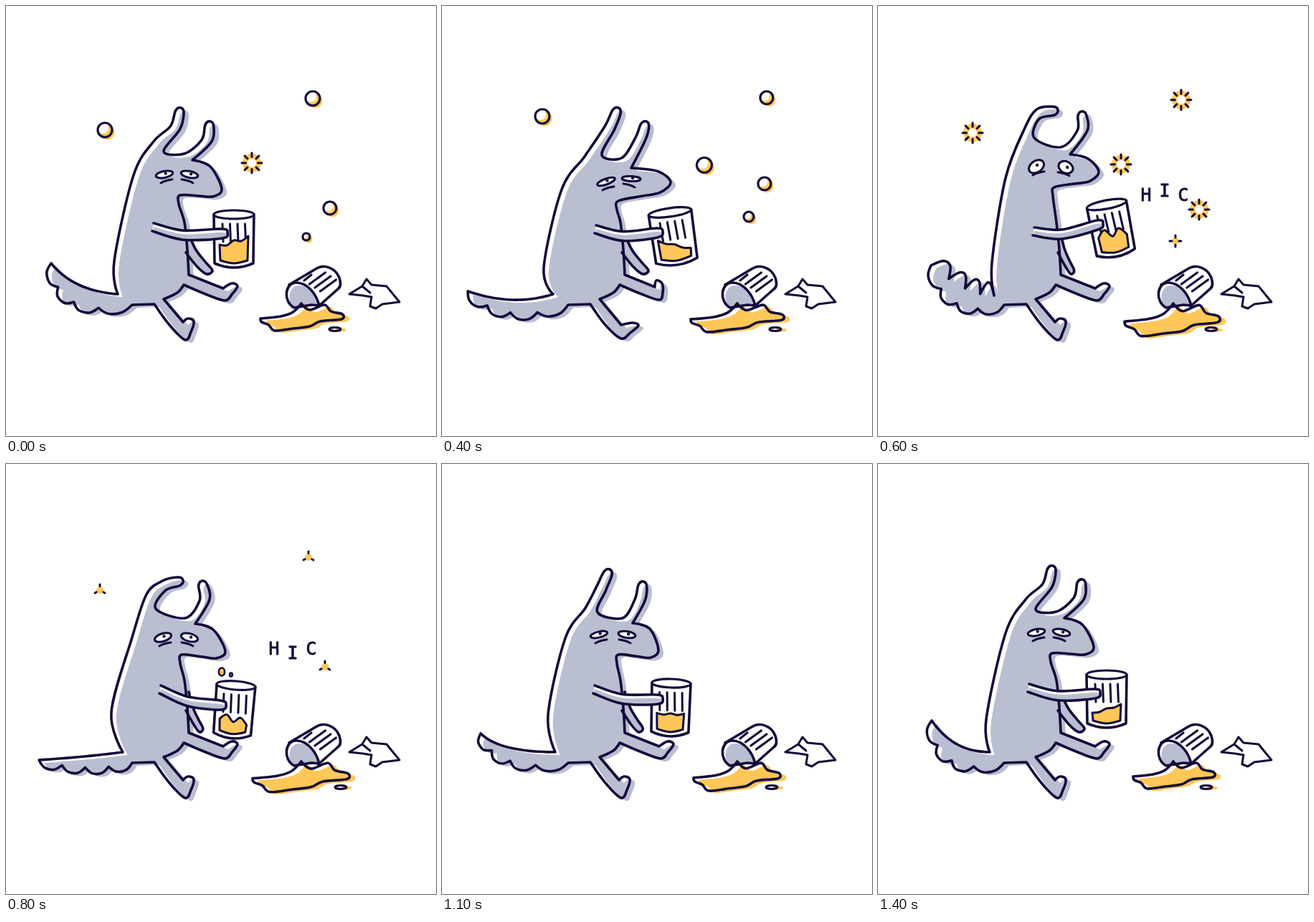
Write an HTML page with a canvas that moves like this. It is 600 px wide and 600 px high and loops after 1500 ms.

```html
<!DOCTYPE html>
<html lang="en">
<head>
<meta charset="utf-8">
<title>Hic</title>
<style>
html, body { margin: 0; width: 100%; height: 100%; overflow: hidden; background: #fff; }
canvas { display: block; }
</style>
</head>
<body>
<canvas width="600" height="600"></canvas>
<script>
const INK = '#140a3a', GREY = '#b9bed1', GOLD = '#ffc757', WHITE = '#fff';
const ctx = document.querySelector('canvas').getContext('2d');

// Key points of a pose; the other poses override only what moves.
// head: root, back, shoulder, nape, ear 1 bend + tip, valley left + right, ear 2 bend + tip, brow, snout, nose, jaw
// tail: tip, lower control, upper control    feet: ankle, toe, heel of each leg    arm: shoulder, hand
// glass: x, y, radius, angle | beer level, slope, wave    puddle: left, right, depth
const base = {
  head: '156,402 151,356 178,236 206,189 236,170 244,142 220,203 249,206 280,188 285,161 260,215 285,224 301,255 243,264',
  tail: '63,359 70,438 95,398', fluff: '0',
  feet: '303,394 319,388 305,411 247,441 258,437 250,466', paw: '285',
  arm: '206,303 309,316', eyes: '221,235,12,4.5,-.2 256,235,12,4.5,.2',
  glass: '318,291,28,0 38,-6,2', puddle: '355,471,1',
  marks: '138,173,10 428,129,10 452,282,9 419,322,5 343,219,10'
};
const poses = {
  drowsy: { kinds: 'bbbbs' },
  alert: {
    head: '153,402 151,358 176,241 203,199 234,166 242,140 225,203 249,204 267,174 269,145 256,216 300,212 314,222 243,267',
    tail: '48,367 55,445 80,402', feet: '294,392 300,384 303,411 251,445 265,440 250,465', paw: '277',
    arm: '214,306 307,326', eyes: '221,232,11,4.5,-.15 256,231,12,4.5,.05',
    glass: '320,296,30,.02 40,0,-5', puddle: '360,467,1', kinds: 'oooor',
    marks: '125,146,6.5 443,148,6.5 464,266,14.5 414,307,6 361,198,10'
  },
  lean: {
    head: '155,402 142,365 167,256 199,210 234,170 246,142 223,208 251,212 277,185 285,161 264,226 302,231 319,246 246,272',
    tail: '36,398 85,448 100,420', feet: '297,392 303,384 303,410 250,445 270,443 250,464',
    arm: '215,306 308,315', eyes: '229,245,13,4,-.35 264,241,13,3.5,.05',
    glass: '318,288,30,-.14 46,8,1', puddle: '347,477,1.05', kinds: 'bbbbb',
    marks: '140,154,10 453,128,9 450,248,9 428,294,7 366,222,10.5'
  },
  hiccup: {
    head: '162,404 159,358 178,240 205,170 223,151 251,145 218,184 255,197 285,174 285,147 268,207 293,213 308,231 246,253',
    tail: '74,362 95,440 125,405', fluff: '16', paw: '272',
    arm: '218,309 314,304', eyes: '221,224,11.5,8,-.6 262,225,10.5,8,.5',
    glass: '319,277,28,-.19 40,1,-5', puddle: '344,477,1.2', kinds: 'sssxs', hic: 3,
    marks: '132,177,10 423,131,10 448,284,10 415,328,5 339,221,10'
  },
  slump: {
    head: '163,402 147,346 176,242 196,182 220,170 247,162 209,202 250,215 277,190 274,163 264,223 289,231 306,261 245,266',
    tail: '46,413 110,432 110,409', paw: '273',
    arm: '216,309 307,335', eyes: '219,242,12,5.5,-.3 256,242,12,5.5,.25',
    glass: '321,309,27,.08 47,3,-4', puddle: '344,479,1.12', kinds: 'tttdd', hic: -3,
    marks: '131,176,8 422,130,8 445,283,8 301,290,5.5 314,294,2.5'
  },
  settle: {
    head: '158,402 148,350 172,243 200,201 222,174 234,147 217,207 252,215 276,190 281,164 266,222 290,230 302,260 246,266',
    tail: '54,376 75,432 80,402', paw: '278',
    arm: '213,309 308,327', eyes: '219,238,12,4,-.25 258,238,12,4.5,.15',
    glass: '320,306,27,.03 43,0,1', puddle: '351,472,1.08'
  },
  calm: { tail: '75,358 80,440 105,402', arm: '211,307 310,319', glass: '319,294,28,0 48,-6,1', puddle: '356,470,1' }
};

const parse = s => s.split(' ').map(p => p.split(',').map(Number));

function blend(from, to = from, k = 0) {
  const a = { ...base, ...poses[from] }, b = { ...base, ...poses[to] };
  const pose = { kinds: b.kinds && a.kinds || '', hic: b.hic && a.hic };
  for (const part in base) {
    const end = parse(b[part]);
    pose[part] = parse(a[part]).map((p, i) => p.map((v, j) => v + (end[i][j] - v) * k));
  }
  return pose;
}

const steps = [
  [0, blend('drowsy')], [200, blend('alert')], [400, blend('lean')],
  [500, { ...blend('lean', 'hiccup', .5), hic: 0 }], [600, blend('hiccup')], [800, blend('slump')],
  [900, blend('slump', 'settle', .2)], [1100, blend('settle')],
  [1200, blend('settle', 'calm', .25)], [1400, blend('calm')]
];

const mix = (a, b, k, dx = 0, dy = 0) => [a[0] + (b[0] - a[0]) * k + dx, a[1] + (b[1] - a[1]) * k + dy];
const corner = ([x, y]) => [x, y, 1];

// Smooth curve through points; corners have no tangent.
function curve(pts, closed) {
  const path = new Path2D(), n = pts.length;
  const at = i => closed ? pts[(i + n) % n] : pts[Math.max(0, Math.min(n - 1, i))];
  const pull = p => p[2] ? 0 : 1 / 6;
  path.moveTo(pts[0][0], pts[0][1]);
  for (let i = 0; i < (closed ? n : n - 1); i++) {
    const a = at(i - 1), b = at(i), c = at(i + 1), d = at(i + 2), k = pull(b), m = pull(c);
    path.bezierCurveTo(b[0] + (c[0] - a[0]) * k, b[1] + (c[1] - a[1]) * k,
      c[0] - (d[0] - b[0]) * m, c[1] - (d[1] - b[1]) * m, c[0], c[1]);
  }
  return path;
}

// Scalloped edge along a quadratic curve
function scallops(from, ctrl, to, count, height) {
  const on = (t, h) => {
    const a = mix(from, ctrl, t), b = mix(ctrl, to, t), p = mix(a, b, t);
    const len = Math.hypot(b[0] - a[0], b[1] - a[1]);
    return [p[0] + (b[1] - a[1]) / len * h, p[1] - (b[0] - a[0]) / len * h];
  };
  const pts = [];
  for (let i = 0; i < count; i++)
    pts.push(corner(on(i / count, 0)), on((i + .3) / count, height), on((i + .7) / count, height));
  return pts;
}

function ear(bend, tip) {
  const dx = tip[0] - bend[0], dy = tip[1] - bend[1], len = Math.hypot(dx, dy);
  const at = (p, side, back) => [p[0] + dy / len * side - dx / len * back, p[1] - dx / len * side - dy / len * back];
  return [at(bend, 7, 0), at(tip, 6, 6), tip, at(tip, -6, 6), at(bend, -7, 0)];
}

const foot = (ankle, toe, heel) =>
  [corner(ankle), mix(toe, toe, 0, -4, -1), mix(toe, toe, 0, 4, 3), mix(toe, heel, .6, 5), heel];

function silhouette({ head, tail, fluff, feet }) {
  const [root, back, shoulder, nape, bend1, tip1, left, right, bend2, tip2, brow, snout, nose, jaw] = head;
  const [tip, under, over] = tail;
  return [
    corner(root), back, shoulder, nape, ...ear(bend1, tip1), left, right, ...ear(bend2, tip2),
    corner(brow), snout, nose, mix(nose, jaw, .2, 0, 9), mix(nose, jaw, .55, 0, 5), jaw, mix(jaw, jaw, 0, -2, 12),
    [249, 302], [253, 340], [255, 375, 1],
    ...foot(...feet.slice(0, 3)), [276, 401], [248, 389, 1], [239, 400], [220, 409, 1],
    ...foot(...feet.slice(3)), [228, 445], [207, 416, 1],
    ...scallops([176, 417], under, tip, 4, 8), ...scallops(tip, over, root, 4, fluff[0][0])
  ];
}

function ellipse(x, y, rx, ry = rx) {
  const path = new Path2D();
  path.ellipse(x, y, rx, ry, 0, 0, 7);
  return path;
}

function fill(path, color, dx = 0, dy = 0) {
  ctx.save();
  ctx.translate(dx, dy);
  ctx.fillStyle = color;
  ctx.fill(path);
  ctx.restore();
}

function shade(path, dx, dy) {
  fill(path, WHITE);
  ctx.save();
  ctx.clip(path);
  fill(path, GREY, dx, dy);
  ctx.restore();
}

function stroke(path, width = 3.6, color = INK) {
  ctx.lineWidth = width;
  ctx.strokeStyle = color;
  ctx.stroke(path);
}

const line = (d, width) => stroke(new Path2D(d), width);

function rays(x, y, count, inner, outer) {
  for (let i = 0; i < count; i++) {
    const a = i * 2 * Math.PI / count - Math.PI / 2, c = Math.cos(a), s = Math.sin(a);
    line(`M${x + c * inner} ${y + s * inner}L${x + c * outer} ${y + s * outer}`, 3);
  }
}

const drawMark = {
  b(x, y, r) { // bubble
    fill(ellipse(x, y, r), GOLD, 3.5, 3.5);
    fill(ellipse(x - 2, y - 2, r * .7), WHITE);
    stroke(ellipse(x, y, r), 3.2);
  },
  s(x, y, r) { stroke(ellipse(x, y, r * .95), 7, GOLD); rays(x, y, 8, r * .85, r * 1.4); }, // spark
  o(x, y, r) { stroke(ellipse(x, y, r), 3.2); }, // empty bubble
  r(x, y, r) { rays(x, y, 6, r * .7, r); }, // burst
  t(x, y, r) { fill(ellipse(x, y, 5), GOLD); rays(x, y, 3, r * .7, r); }, // fading spark
  x(x, y, r) { fill(ellipse(x, y, r), GOLD); rays(x, y, 4, r, r * 1.6); }, // glint
  d(x, y, r) { const drop = ellipse(x, y, r * .75, r); fill(drop, GOLD); stroke(drop, 2.6); } // drop
};

function drawEye([x, y, rx, ry, angle], side) {
  const eye = ellipse(0, 0, rx, ry), dir = side ? -1 : 1;
  ctx.save();
  ctx.translate(x, y);
  ctx.rotate(angle);
  fill(eye, WHITE);
  fill(ellipse(2, -1, 2.2), INK);
  stroke(eye, 3);
  ctx.restore();
  line(`M${x - 5 * dir} ${y + 12}Q${x + 2 * dir} ${y + 8} ${x + 11 * dir} ${y + 7}`, 3);
}

function drawGlass([[x, y, r, angle], [level, slope, wave]]) {
  const wall = new Path2D(`M${-r} 0L${1 - r} 68Q0 80 ${r - 1} 68L${r} 0`);
  const rim = ellipse(0, 0, r, 6), w = r - 8;
  const surface = [-1, -.5, 0, .5, 1].map(u => [u * w, level + slope * u - wave * Math.cos(u * 2 * Math.PI), Math.abs(u) === 1]);
  const beer = curve([...surface, [w - 1, 64, 1], [0, 68], [1 - w, 64, 1]], true);
  ctx.save();
  ctx.translate(x, y);
  ctx.rotate(angle);
  fill(wall, WHITE);
  stroke(wall);
  fill(rim, WHITE);
  stroke(rim, 3.2);
  for (let dx = -16; dx < 18; dx += 10.5) line(`M${dx} 13L${dx + 1} 38`, 3);
  fill(beer, GOLD);
  stroke(beer, 3);
  ctx.restore();
}

function drawCreature(p) {
  const skin = curve(silhouette(p), true), reach = p.paw[0][0] - 255;
  const limb = curve([[251, 344, 1], ...[[.4, 364], [.83, 374], [1.1, 369], [.77, 357], [.33, 340]]
    .map(([k, y]) => [255 + reach * k, y]), [255, 318, 1]]);
  fill(limb, GREY, 2, 1);
  fill(skin, GREY, 7, 4);
  stroke(limb);
  stroke(skin);
  p.eyes.forEach(drawEye);
  drawGlass(p.glass);
  const [from, hand] = p.arm;
  const arm = curve([from, mix(from, hand, .4, 0, 5), mix(hand, hand, 0, -8, -5), hand,
    mix(hand, hand, 0, -7, 8), mix(from, hand, .4, 0, 18), mix(from, from, 0, -2, 11)]);
  shade(arm, 0, 5);
  stroke(arm);
}

function drawSpill([[left, right, depth]]) {
  const tumbler = new Path2D('M395 389L432 367C444 359 460 366 465 379Q469 391 463 395L436 419');
  const mouth = new Path2D('M402 421C386 412 389 386 405 386C420 386 433 401 437 418L426 417Z');
  // Both sides of the spout stretch to the given width.
  const puddle = curve(parse('-1,21,1 -.5,18 -.2,12 0,0,1 .2,9 .55,2 .7,11 .97,15 .95,22 .45,25 .2,32 -.2,35 -.65,38 -.8,30 -.97,26')
    .map(([u, y, sharp]) => [412 + u * (u < 0 ? 412 - left : right - 412), 415 + y * depth, sharp]), true);
  const drop = ellipse(right - 12, 451, 8, 2.5);
  fill(tumbler, WHITE);
  shade(mouth, 4, 4);
  fill(puddle, WHITE);
  fill(puddle, GOLD, 8, 3);
  fill(drop, GOLD, 8, 1);
  [tumbler, mouth, puddle].forEach(path => stroke(path));
  stroke(drop, 3);
  for (let i = 0; i < 4; i++) line(`M${416 + i * 7.5} ${383 + i * 5}l${i ? 22 : 10} ${i ? -16 : -8}`, 3.2);
  line('M479 402L497 391L503 381L510 389L531 391L549 413L525 416L516 422L508 419L510 406L498 404ZM497 391L508 400', 3);
}

function drawHic(sway) {
  ctx.font = '25px "DejaVu Sans Mono", monospace';
  ctx.textAlign = 'center';
  ctx.fillStyle = ctx.strokeStyle = INK;
  ctx.lineWidth = .8;
  [...'HIC'].forEach((letter, i) => {
    const at = [letter, 374 + 26 * i, 269 + sway * Math.cos(i * Math.PI)];
    ctx.fillText(...at);
    ctx.strokeText(...at);
  });
}

function render(time) {
  const pose = steps.findLast(([start]) => start <= time)[1];
  ctx.fillStyle = WHITE;
  ctx.fillRect(0, 0, 600, 600);
  ctx.lineCap = ctx.lineJoin = 'round';
  drawSpill(pose.puddle);
  drawCreature(pose);
  [...pose.kinds].forEach((kind, i) => drawMark[kind](...pose.marks[i]));
  if (pose.hic) drawHic(pose.hic);
}

function loop() {
  render(performance.now() % 1500);
  requestAnimationFrame(loop);
}
loop();
</script>
</body>
</html>
```
